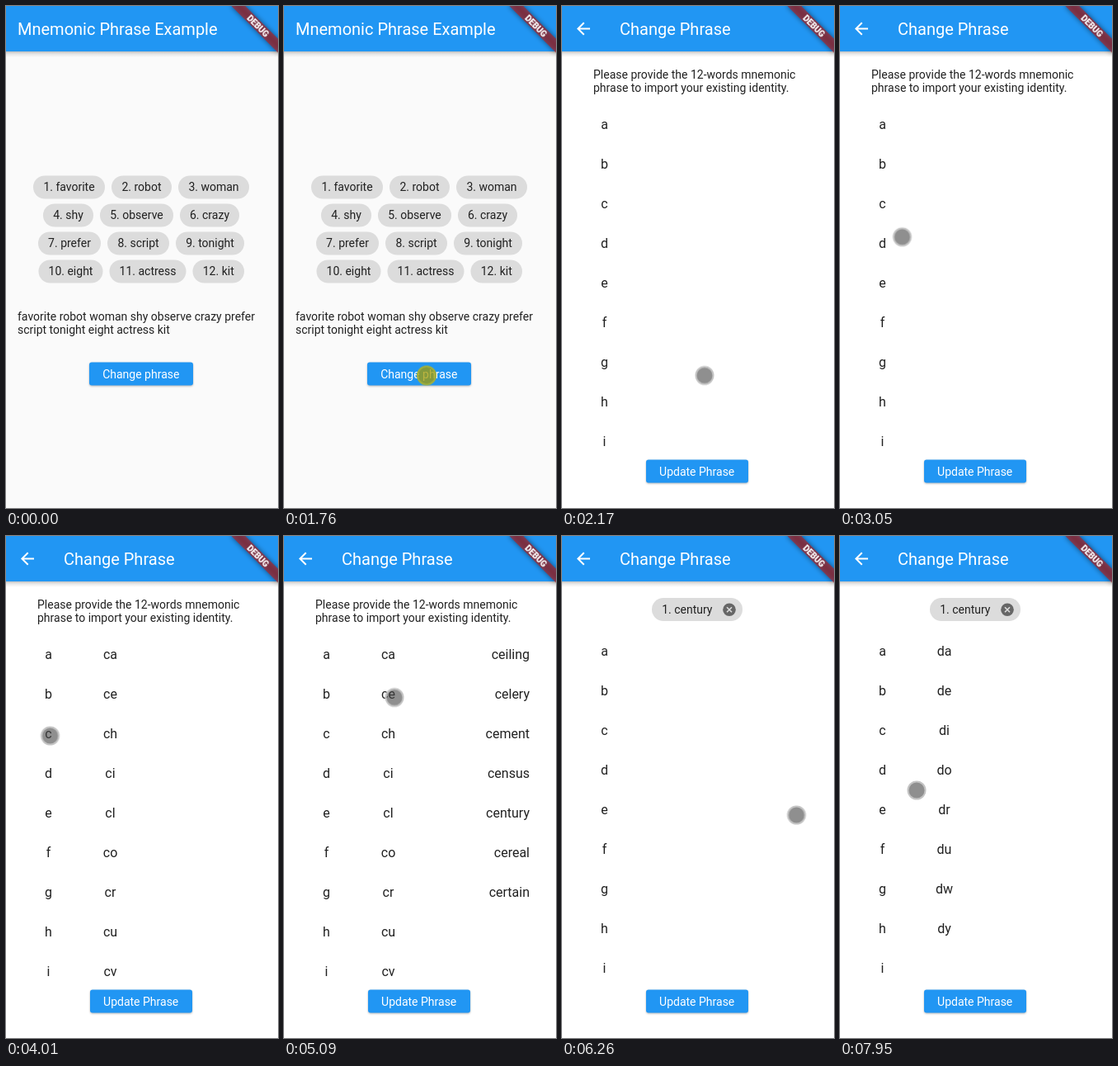
Animation, 330 px wide and 608 px high, one loop 8 s. Source, as an HTML page:

```html
<!DOCTYPE html>
<html lang="en">
<head>
<meta charset="utf-8">
<title>Mnemonic Phrase Example</title>
<style>
  html, body { margin: 0; width: 100%; height: 100%; overflow: hidden; background: #fafafa; }
  svg { display: block; width: 330px; height: 608px; font: 14px Roboto, sans-serif; fill: #212121; }
  .bar, .button rect { fill: #2196f3; }
  .title { font-size: 20px; fill: #fff; }
  .button rect { filter: drop-shadow(0 1px 1px rgba(0, 0, 0, .28)); }
  .button text, .chip text { text-anchor: middle; }
  .button text { fill: #fff; }
  .chip rect { fill: #dcdcdc; }
  .list { font-size: 16px; text-anchor: middle; }
  .words { text-anchor: end; }
  .banner rect { fill: #b71c1c; fill-opacity: .627; }
  .banner text { font-size: 10.2px; font-weight: 900; fill: #fff; text-anchor: middle; }

  /* 1% of the loop is 80 ms */
  #change { animation: fade 8s infinite, rise 8s infinite; }
  #cursor { animation: move 8s infinite; }
  #intro, #picked, .list, #ca, #ce, #da, .idle, .press { animation: 8s step-end infinite; }
  #intro { animation-name: intro; }
  #picked { animation-name: picked; }
  .list { animation-name: lift; }
  #ca { animation-name: ca; }
  #ce { animation-name: ce; }
  #da { animation-name: da; }
  .idle { animation-name: idle; }
  .press { animation-name: press; }

  @keyframes fade {
    0%, 23% { opacity: 0; animation-timing-function: ease-in; }
    26.75%, 100% { opacity: 1; }
  }
  @keyframes rise {
    0%, 23% { transform: translateY(152px); animation-timing-function: cubic-bezier(.4, 0, .2, 1); }
    26.75%, 100% { transform: none; }
  }
  @keyframes intro { 0% { opacity: 1; } 76.6%, 100% { opacity: 0; } }
  @keyframes picked { 0% { opacity: 0; } 76.6%, 100% { opacity: 1; } }
  @keyframes lift { 0% { transform: none; } 76.6%, 100% { transform: translateY(-4px); } }
  @keyframes ca { 0% { opacity: 0; } 44.2% { opacity: 1; } 76.6%, 100% { opacity: 0; } }
  @keyframes ce { 0% { opacity: 0; } 56.95% { opacity: 1; } 76.6%, 100% { opacity: 0; } }
  @keyframes da { 0% { opacity: 0; } 90.85%, 100% { opacity: 1; } }
  @keyframes idle {
    0%, 22.75%, 44.2%, 55.35%, 74.85%, 90.85%, 100% { opacity: 1; }
    21.97%, 43.35%, 54.47%, 74.1%, 89.97% { opacity: 0; }
  }
  @keyframes press {
    0%, 22.75%, 44.2%, 55.35%, 74.85%, 90.85%, 100% { opacity: 0; }
    21.97%, 43.35%, 54.47%, 74.1%, 89.97% { opacity: 1; }
  }
  @keyframes move {
    0%, 5.5% { transform: translate(241px, 622px); animation-timing-function: ease-in-out; }
    12%, 31.6% { transform: translate(173px, 447.5px); animation-timing-function: ease-in-out; }
    40.9%, 50.1% { transform: translate(53.5px, 242px); animation-timing-function: ease-in-out; }
    52.75%, 63.6% { transform: translate(134px, 195.5px); animation-timing-function: ease-in; }
    65.6% { transform: translate(165px, 203px); animation-timing-function: linear; }
    67.2% { transform: translate(212px, 220px); animation-timing-function: linear; }
    69% { transform: translate(258px, 237px); animation-timing-function: linear; }
    70.5% { transform: translate(283px, 270px); animation-timing-function: linear; }
    71.8% { transform: translate(289px, 305px); animation-timing-function: ease-out; }
    73.25% { transform: translate(286px, 334px); animation-timing-function: linear; }
    74.1%, 82.2% { transform: translate(284.5px, 338px); animation-timing-function: ease-in; }
    83.2% { transform: translate(264px, 332px); animation-timing-function: linear; }
    84.9% { transform: translate(175px, 295px); animation-timing-function: linear; }
    86.3% { transform: translate(95px, 273px); animation-timing-function: ease-out; }
    87.75%, 98.1% { transform: translate(53px, 285px); animation-timing-function: ease-in-out; }
    99.35%, 100% { transform: translate(93px, 308px); }
  }
</style>
</head>
<body>
<svg viewBox="0 0 330 608">
  <defs>
    <linearGradient id="shade" x2="0" y2="1">
      <stop stop-opacity=".24"/>
      <stop offset=".4" stop-opacity=".09"/>
      <stop offset="1" stop-opacity="0"/>
    </linearGradient>
    <filter id="soft" x="-20%" y="-100%" width="140%" height="300%">
      <feGaussianBlur stdDeviation="3"/>
    </filter>
    <g id="appbar">
      <rect y="55" width="330" height="7" fill="url(#shade)"/>
      <rect class="bar" width="330" height="55"/>
    </g>
  </defs>

  <g id="home">
    <rect width="330" height="608" fill="#fafafa"/>
    <use href="#appbar"/>
    <text class="title" x="14" y="35">Mnemonic Phrase Example</text>
    <g id="phrase"></g>
    <text x="14" y="380.5">favorite robot woman shy observe crazy prefer</text>
    <text x="14" y="396.5">script tonight eight actress kit</text>
    <g class="button">
      <rect x="101" y="431.5" width="126" height="28" rx="3"/>
      <text x="163.8" y="451">Change phrase</text>
    </g>
  </g>

  <g id="change">
    <rect width="330" height="608" fill="#fff"/>
    <use href="#appbar"/>
    <path fill="#fff" transform="translate(14 15.5)"
      d="M20 11H7.83l5.59-5.59L12 4l-8 8 8 8 1.41-1.41L7.83 13H20z"/>
    <text class="title" x="70" y="35">Change Phrase</text>
    <g id="intro">
      <text x="38" y="88">Please provide the 12-words mnemonic</text>
      <text x="38" y="104">phrase to import your existing identity.</text>
    </g>
    <g id="picked" class="chip">
      <rect x="109" y="75" width="110" height="28" rx="14"/>
      <text x="151.8" y="94">1. century</text>
      <circle cx="203" cy="89.3" r="7.8" fill="#666"/>
      <path d="M200 86.3l6 6m0-6l-6 6" stroke="#dcdcdc" stroke-width="1.6"/>
    </g>
    <g class="list">
      <g id="initials"></g>
      <g id="ca"></g>
      <g id="ce" class="words"></g>
      <g id="da"></g>
    </g>
    <g class="button">
      <rect x="102" y="549.5" width="124" height="28" rx="3"/>
      <text x="163.7" y="569">Update Phrase</text>
    </g>
  </g>

  <g class="banner" transform="translate(330 0) rotate(45)">
    <rect x="-40" y="28" width="80" height="12" style="fill:#000;fill-opacity:.5" filter="url(#soft)"/>
    <rect x="-40" y="28" width="80" height="12"/>
    <text y="37.7">DEBUG</text>
  </g>

  <g id="cursor">
    <g class="idle">
      <circle r="11" fill="#444" fill-opacity=".6"/>
      <circle r="10.5" fill="none" stroke="#c4c4c4" stroke-width="2"/>
    </g>
    <g class="press">
      <circle r="11" fill="#a59b00" fill-opacity=".75"/>
      <circle r="11" fill="none" stroke="#a2b03c" stroke-width="2"/>
    </g>
  </g>
</svg>
<script>
  const fill = (id, html) => document.getElementById(id).innerHTML = html;

  // Each chip: word, left edge, right edge
  const chips = [
    ['favorite', 33, 120], ['robot', 128, 201], ['woman', 209, 295],
    ['shy', 45, 106], ['observe', 114, 203], ['crazy', 211, 283],
    ['prefer', 39, 115], ['script', 123, 198], ['tonight', 206, 289],
    ['eight', 39.5, 117.5], ['actress', 125.5, 218.5], ['kit', 226.5, 289]
  ];
  fill('phrase', chips.map(([word, left, right], i) => {
    const y = 205.5 + 34 * Math.floor(i / 3);
    return `<g class="chip"><rect x="${left}" y="${y}" width="${right - left}" height="28" rx="14"/>
      <text x="${(left + right) / 2}" y="${y + 18.7}">${i + 1}. ${word}</text></g>`;
  }).join(''));

  const column = (id, x, items) => fill(id, items.split(' ').map((item, i) =>
    `<text x="${x}" y="${149 + 48 * i}">${item}</text>`).join(''));
  column('initials', 51.5, 'a b c d e f g h i');
  column('ca', 126.5, 'ca ce ch ci cl co cr cu cv');
  column('ce', 298, 'ceiling celery cement census century cereal certain');
  column('da', 126.5, 'da de di do dr du dw dy');
</script>
</body>
</html>
```
